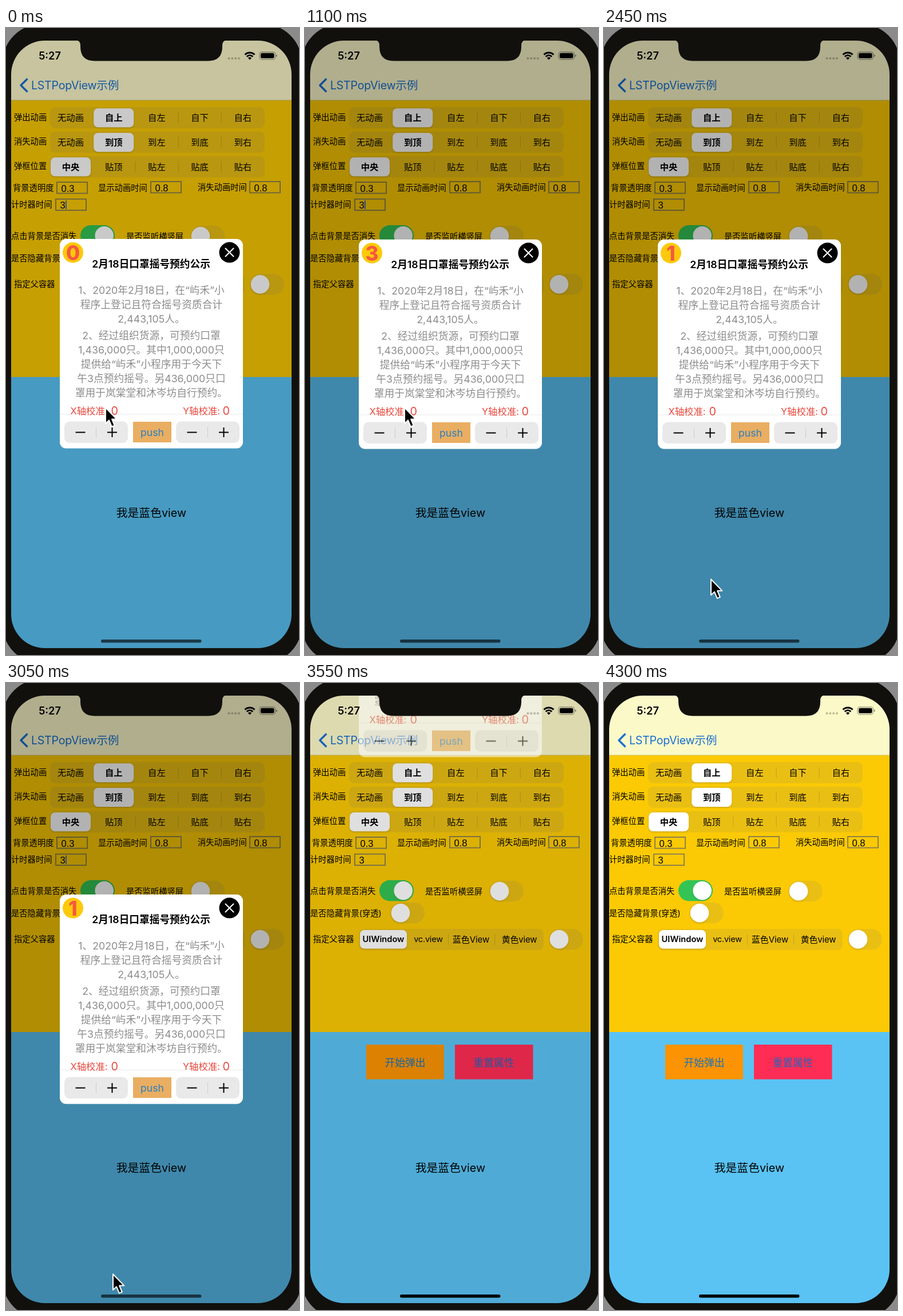
Write an HTML page that moves like this. It is 512 px wide and 1094 px high and loops after 4.35 s.

```html
<!DOCTYPE html>
<html lang="zh-CN">
<head>
<meta charset="utf-8">
<title>LSTPopView示例</title>
<style>
  html, body { margin: 0; width: 100%; height: 100%; overflow: hidden; background: #8b8b8b; }
  svg { display: block; width: 100vw; height: 100vh; }
  text { font-family: Inter, 'Noto Sans CJK SC', 'Noto Sans CJK', sans-serif; }
  .field { font-family: 'Liberation Sans', sans-serif; }

  .anim { animation: 4350ms linear infinite; }
  #dim { animation-name: dim; }
  #layer { animation-name: fade; }
  #popup { animation-name: slide; }
  #digits { animation-name: count; animation-timing-function: step-end; }
  #caret { animation-name: caret; }
  #home { animation-name: home; }
  #cursor { animation-name: cursor; }

  @keyframes dim {
    0% { opacity: .21 }
    5%, 76.1% { opacity: .3; animation-timing-function: ease-in-out }
    86.2%, 100% { opacity: 0 }
  }
  @keyframes fade {
    0%, 75.17% { opacity: 1; animation-timing-function: ease-in-out }
    88.97%, 100% { opacity: 0 }
  }
  @keyframes slide {
    0% { transform: translateY(-1px) }
    3.5%, 72.33% { transform: translateY(0); animation-timing-function: ease-in-out }
    85.44%, 100% { transform: translateY(-734px) }
  }
  @keyframes count {
    0% { transform: translateY(0) }
    4.6% { transform: translateY(-50px) }
    27.6% { transform: translateY(-100px) }
    50.6% { transform: translateY(-150px) }
    72.33%, 100% { transform: translateY(0) }
  }
  @keyframes caret {
    0%, 3.4% { opacity: 1 }
    5%, 13.5% { opacity: 0 }
    15%, 26.4% { opacity: 1 }
    28%, 36.5% { opacity: 0 }
    38%, 49.4% { opacity: 1 }
    51%, 59.5% { opacity: 0 }
    61%, 72.4% { opacity: 1 }
    74%, 100% { opacity: 0 }
  }
  @keyframes home { 0%, 71% { opacity: .62 } 75.5%, 100% { opacity: 1 } }
  @keyframes cursor {
    0%, 35.6% { transform: translate(174px, 662.5px) }
    40.2% { transform: translate(187px, 647px) }
    42.5% { transform: translate(187px, 647px); animation-timing-function: ease-in-out }
    54% { transform: translate(187px, 958px) }
    64.4% { transform: translate(187px, 975px) }
    75.9% { transform: translate(187px, 1088px) }
    76.9%, 100% { transform: translate(187px, 1140px) }
  }
</style>
</head>
<body>
<svg id="stage" viewBox="0 0 512 1094" preserveAspectRatio="none"></svg>
<script>
const rect = (x, y, w, h, fill, r = 0, extra = '') =>
  `<rect x="${x}" y="${y}" width="${w}" height="${h}" rx="${r}" fill="${fill}" ${extra}/>`;
const circle = (x, y, r, fill) => `<circle cx="${x}" cy="${y}" r="${r}" fill="${fill}"/>`;
const line = (d, color, width, extra = '') =>
  `<path d="${d}" fill="none" stroke="${color}" stroke-width="${width}" ${extra}/>`;
// Text placed by its vertical middle
const text = (x, midY, size, str, fill = '#000', extra = '') =>
  `<text x="${x}" y="${midY + size * .37}" font-size="${size}" fill="${fill}" ${extra}>${str}</text>`;
const centered = (x, midY, size, str, fill, extra = '') =>
  text(x, midY, size, str, fill, `text-anchor="middle" ${extra}`);

const TRACK = 'rgba(118,118,128,.13)';
const DIVIDER = 'rgba(100,90,40,.28)';
const SHADOW = 'filter="url(#soft)"';
const LABEL = 14.3;

function segments(y, items, selected) {
  const cx = i => 113 + 75.2 * i;
  let out = rect(77, y, 375, 37, TRACK, 9);
  items.forEach((item, i) => {
    if (i === selected) out += rect(cx(i) - 35, y + 2.3, 70, 33, '#fff', 7.5, SHADOW);
    if (i > selected + 1) out += rect(cx(i) - 38, y + 9, 1, 19, DIVIDER);
    out += centered(cx(i), y + 18.8, 15.3, item, '#000', i === selected ? 'font-weight="600"' : '');
  });
  return out;
}

function field(x, y, value) {
  return rect(x + 1, y + 1, 53, 19.5, 'none', 0, 'stroke="#857b50" stroke-width="1.8"') +
    text(x + 8.5, y + 11.8, 16.6, value, '#000', 'class="field"');
}

function toggle(x, y, on) {
  return rect(x, y, 60, 36.5, on ? '#34c455' : TRACK, 18.2) +
    `<g ${SHADOW}>${circle(x + (on ? 41.7 : 18), y + 18.2, 16.3, '#fff')}</g>`;
}

function parentPicker() {
  return rect(94, 429, 323, 37, TRACK, 9) +
    rect(96, 431, 82, 32.5, '#fff', 7.5, SHADOW) +
    rect(250, 438, 1, 19, DIVIDER) + rect(331, 438, 1, 19, DIVIDER) +
    centered(137, 447, 14.7, 'UIWindow', '#000', 'font-weight="600"') +
    centered(215.5, 447, 14.5, 'vc.view', '#000', 'letter-spacing="-.2"') +
    centered(290, 447, 15, '蓝色View') +
    centered(374.5, 447, 15, '黄色view', '#000', 'letter-spacing="-.2"');
}

function page() {
  return rect(9, 22, 490, 104, '#fcf9c9') +
    rect(9, 126, 490, 483, '#fbca04') +
    rect(9, 125.5, 490, 1, '#cfbf6a') +
    rect(9, 609, 490, 473, '#5ac3f4') +
    line('M37.5 88.5L26 100L37.5 111.5', '#1870d2', 3.3, 'stroke-linejoin="round"') +
    text(44, 100, 19.7, 'LSTPopView示例', '#1870d2', 'letter-spacing="-.3"') +
    text(14, 156, LABEL, '弹出动画') + segments(138, ['无动画', '自上', '自左', '自下', '自右'], 1) +
    text(14, 198, LABEL, '消失动画') + segments(180.7, ['无动画', '到顶', '到左', '到底', '到右'], 1) +
    text(14, 240.5, LABEL, '弹框位置') + segments(223.4, ['中央', '贴顶', '贴左', '贴底', '贴右'], 0) +
    text(12, 278.5, LABEL, '背景透明度') + field(88, 268, '0.3') +
    text(161, 278.5, LABEL, '显示动画时间') + field(252, 267, '0.8') +
    text(335, 277.5, LABEL, '消失动画时间') + field(425, 267, '0.8') +
    text(9, 308, LABEL, '计时器时间') + field(86, 297.5, '3') +
    rect(104, 301, 1.8, 15, '#2a62c8', 0, 'id="caret" class="anim"') +
    text(9, 362.5, LABEL, '点击背景是否消失') + toggle(130, 344, true) +
    text(210, 363.5, LABEL, '是否监听横竖屏') + toggle(322, 345, false) +
    text(9, 401.5, LABEL, '是否隐藏背景(穿透)') + toggle(149, 383, false) +
    text(14, 446.5, LABEL, '指定父容器') + parentPicker() + toggle(426, 429, false) +
    rect(107, 631, 136, 60.5, '#fb9302') + centered(175, 662, 17.8, '开始弹出', '#1773bd') +
    rect(262, 631, 136.5, 60.5, '#ff2d55') + centered(330, 662, 17.8, '重置属性', '#2a62b8') +
    centered(254, 846, 19.8, '我是蓝色view');
}

function stepper(x) {
  return rect(x, 687.5, 111, 37.5, '#e9e9ea', 9) +
    rect(x + 55, 697, 1, 19, '#cdcdd0') +
    line(`M${x + 19.5} 706.5h17M${x + 75} 706.5h17m-8.5 -8.5v17`, '#000', 2);
}

function popup() {
  const body = [
    [458, '1、2020年2月18日，在“屿禾”小'],
    [483, '程序上登记且符合摇号资质合计'],
    [508, '2,443,105人。'],
    [537.5, '2、经过组织货源，可预约口罩'],
    [562, '1,436,000只。其中1,000,000只'],
    [587, '提供给“屿禾”小程序用于今天下'],
    [612, '午3点预约摇号。另436,000只口'],
    [637, '罩用于岚棠堂和沐岑坊自行预约。']
  ];
  const digits = [0, 3, 2, 1].map((n, i) =>
    centered(117, 393 + 50 * i, 35, n, '#f5583f', 'font-weight="800"')).join('');
  return rect(94, 369, 320, 365.5, '#fff', 11) +
    circle(117, 392.7, 18, '#fdc90a') +
    `<g clip-path="url(#badge)"><g id="digits" class="anim">${digits}</g></g>` +
    circle(390.5, 392.6, 18, '#000') +
    line('M383.5 385.6l14 14m0 -14l-14 14', '#fff', 2.1, 'stroke-linecap="round"') +
    centered(253.5, 412.5, 17.7, '2月18日口罩摇号预约公示', '#000', 'font-weight="600"') +
    body.map(([y, s]) => centered(254, y, 17.76, s, '#8c8c8c')).join('') +
    rect(94, 674.5, 320, 1, '#e9e9e9') +
    text(112.5, 668.5, 16.4, 'X轴校准:', '#e8473c') + text(183.5, 668.5, 19.8, '0', '#e8473c') +
    text(309, 669, 16.4, 'Y轴校准:', '#e8473c') + text(378.5, 669, 19.8, '0', '#e8473c') +
    stepper(102) + stepper(297) +
    rect(222, 688, 67, 36, '#e9ae62') + centered(255.5, 706.5, 17.6, 'push', '#2a7fc4');
}

function status() {
  const dots = [389.5, 395.3, 401.1, 406.9].map(x => circle(x, 53, 2, 'rgba(0,0,0,.25)')).join('');
  return centered(76.5, 48.5, 18.2, '5:27', '#000', 'font-weight="600"') + dots +
    line('M417.5 46.5a12 12 0 0 1 17 0', '#000', 2.9) +
    line('M420.7 50a7.2 7.2 0 0 1 10.6 0', '#000', 2.7) +
    '<path d="M426 55.5l-3.2 -3.3a4.6 4.6 0 0 1 6.4 0z"/>' +
    rect(443, 41.8, 27.5, 13, 'none', 4, 'stroke="#000" stroke-opacity=".4" stroke-width="1.2"') +
    rect(445, 43.8, 23.5, 9, '#000', 2.4) +
    '<path d="M472 46v4.6q1.8 -.6 1.8 -2.3t-1.8 -2.3z" fill-opacity=".45"/>';
}

const roundBox = (x, y, w, h, r) =>
  `M${x + r} ${y}h${w - 2 * r}a${r} ${r} 0 0 1 ${r} ${r}v${h - 2 * r}a${r} ${r} 0 0 1 ${-r} ${r}` +
  `h${2 * r - w}a${r} ${r} 0 0 1 ${-r} ${-r}v${2 * r - h}a${r} ${r} 0 0 1 ${r} ${-r}z`;

function bezel() {
  return `<path fill="#11100d" fill-rule="evenodd"
      d="${roundBox(-6, -7, 523, 1116, 68)}${roundBox(9, 22, 490, 1060, 59)}"/>
    <path fill="#11100d" d="M122 21.5q8 0 8 9v2q0 25 25 25h198q25 0 25 -25v-2q0 -9 8 -9z"/>`;
}

document.getElementById('stage').innerHTML = `
  <defs>
    <clipPath id="badge"><circle cx="117" cy="392.7" r="18"/></clipPath>
    <filter id="soft" x="-20%" y="-20%" width="140%" height="150%" color-interpolation-filters="sRGB">
      <feDropShadow dx="0" dy="1.5" stdDeviation="1.6" flood-opacity=".12"/>
    </filter>
  </defs>
  ${rect(0, 0, 512, 1094, '#8b8b8b')}
  ${page()}
  ${rect(9, 22, 490, 1060, '#000', 0, 'id="dim" class="anim"')}
  <g id="layer" class="anim"><g id="popup" class="anim">${popup()}</g></g>
  ${status()}
  ${bezel()}
  ${rect(166, 1067, 175.5, 5.5, '#000', 2.7, 'id="home" class="anim"')}
  <g id="cursor" class="anim">
    <path d="M0 0v27.5l6 -5.6l4.8 11.2l5 -2.1l-4.7 -10.9h8.4z" stroke="#fff" stroke-width="2" stroke-linejoin="round"/>
  </g>`;
</script>
</body>
</html>
```
